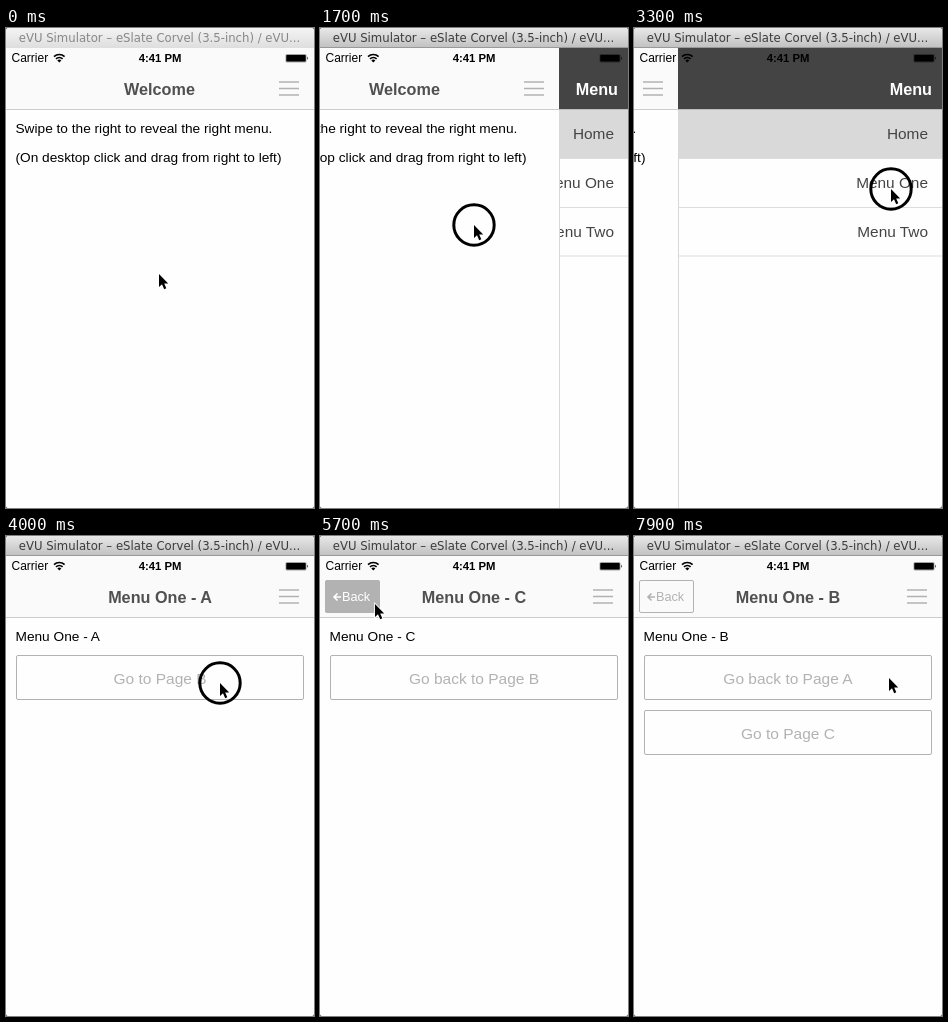
Animation, 308 px wide and 480 px high, one loop 8 s. Source, as an HTML page:

```html
<!DOCTYPE html>
<html lang="en">
<head>
<meta charset="utf-8">
<title>Side menu demo</title>
<style>
html, body { margin: 0; width: 100%; height: 100%; overflow: hidden; background: #666; }
svg { display: block; width: 100vw; height: 100vh; }
text { font-family: "Liberation Sans", Arial, sans-serif; }
.bar { font: 11.7px "DejaVu Sans", "Open Sans", sans-serif; text-anchor: middle; }
.title { font-size: 16.2px; font-weight: 700; fill: #505050; text-anchor: middle; }
.body { font-size: 13.68px; fill: #000; }
.item { font-size: 15.4px; fill: #444; text-anchor: end; }
.btn { font-size: 15.5px; fill: #b2b2b2; text-anchor: middle; }
.line { fill: none; stroke: #b2b2b2; }
.rule { stroke: #ddd; }

/* one loop is 8 s, so 100 ms = 1.25% */
.win, .page, .home, .a, .b, .c, .held, .ring, .cursor { animation: 8s linear infinite; }
.win, .home, .a, .b, .c, .held, .ring { animation-timing-function: step-end; }
.win { animation-name: win; }
.page { animation-name: page; }
.home { animation-name: home; }
.a { animation-name: a; }
.b { animation-name: b; }
.c { animation-name: c; }
.held { animation-name: held; }
.ring { animation-name: ring; }
.cursor { animation-name: cursor; }

.back { --bg: #fafafa; --fg: #b2b2b2; }
.held { --bg: #b2b2b2; --fg: #fff; }

@keyframes win { 0% { opacity: 0 } 16.25%, 100% { opacity: 1 } }
@keyframes home { 0% { opacity: 1 } 43.75%, 100% { opacity: 0 } }
@keyframes a { 0%, 52.5%, 100% { opacity: 0 } 43.75% { opacity: 1 } }
@keyframes b { 0%, 65%, 86.25% { opacity: 0 } 52.5%, 75%, 93.75%, 100% { opacity: 1 } }
@keyframes c { 0%, 75%, 93.75%, 100% { opacity: 0 } 65%, 86.25% { opacity: 1 } }
@keyframes held { 0%, 73.75%, 100% { opacity: 0 } 71.25% { opacity: 1 } }
@keyframes ring {
  0%, 27.5%, 42.5%, 52.5%, 65%, 71.25%, 86.25%, 93.75%, 100% { opacity: 0 }
  12.5%, 40%, 48.75%, 61.25%, 70%, 83.75%, 91.25% { opacity: 1 }
}
@keyframes page {
  0%, 16.25% { transform: translateX(0) }
  21.25% { transform: translateX(-69px) }
  26.25% { transform: translateX(-92px) }
  28.75% { transform: translateX(-148px); animation-timing-function: ease-out }
  33.75%, 43.75% { transform: translateX(-264px); animation-timing-function: ease-out }
  47.5%, 100% { transform: translateX(0) }
}
@keyframes cursor {
  0%, 3.75% { transform: translate(153px, 246px) }
  6.25%, 7.5% { transform: translate(281px, 114px) }
  11.25%, 15% { transform: translate(277px, 190px) }
  21.25% { transform: translate(154px, 197px) }
  25%, 32.5% { transform: translate(136px, 190px) }
  38.75%, 43.75% { transform: translate(257px, 161px) }
  48.75%, 53.75% { transform: translate(214px, 147px) }
  60%, 66.25% { transform: translate(175px, 197px) }
  70%, 77.5% { transform: translate(55px, 68px) }
  82.5%, 87.5% { transform: translate(165px, 197px) }
  91.25%, 95% { transform: translate(117px, 147px) }
  98.75%, 100% { transform: translate(255px, 142px) }
}
</style>
</head>
<body>
<svg viewBox="0 0 308 480">
  <defs>
    <linearGradient id="idle" x2="0" y2="1"><stop stop-color="#f4f4f4"/><stop offset="1" stop-color="#dedede"/></linearGradient>
    <linearGradient id="live" x2="0" y2="1"><stop stop-color="#e8e8e8"/><stop offset="1" stop-color="#c0c0c0"/></linearGradient>
    <clipPath id="frame"><rect width="308" height="480" rx="3"/></clipPath>
    <rect id="box" x="10.5" y="119.5" width="287" height="44" rx="1.5" class="line"/>
    <text id="name" x="153.5" y="14" class="bar">eVU Simulator – eSlate Corvel (3.5-inch) / eVU...</text>
    <g id="back">
      <rect x="5.5" y="44.5" width="54" height="32" rx="1.5" stroke="#b2b2b2" style="fill:var(--bg)"/>
      <path d="M21 61H14.5M17.5 57.5L14 61L17.5 64.5" fill="none" stroke-width="1.6" style="stroke:var(--fg)"/>
      <text x="22" y="65.3" font-size="12.7" style="fill:var(--fg)">Back</text>
    </g>
  </defs>

  <g clip-path="url(#frame)">
    <rect width="308" height="480" fill="#fefefe"/>

    <g class="menu">
      <rect x="40" y="20" width="268" height="61.5" fill="#444"/>
      <text x="298" y="66.5" class="title" style="fill:#fff;text-anchor:end">Menu</text>
      <rect x="40" y="81.5" width="268" height="49" fill="#d9d9d9"/>
      <path d="M40 130.5H308M40 179.5H308M40 228H308" class="rule"/>
      <text x="294" y="111" class="item">Home</text>
      <text x="294" y="160" class="item">Menu One</text>
      <text x="294" y="209" class="item">Menu Two</text>
    </g>

    <g class="page">
      <path d="M308.5 82V480" stroke="#d8d8d8"/>
      <rect y="20" width="308" height="460" fill="#fefefe"/>
      <rect y="20" width="308" height="61" fill="#fafafa"/>
      <path d="M0 81.5H308" stroke="#ccc"/>
      <path d="M273 54H293M273 60.5H293M273 67H293" class="line" stroke-width="1.5"/>

      <g class="home">
        <text x="153.5" y="66.5" class="title">Welcome</text>
        <text x="9.5" y="105" class="body">Swipe to the right to reveal the right menu.</text>
        <text x="9.5" y="134" class="body">(On desktop click and drag from right to left)</text>
      </g>
      <g class="a">
        <text x="154" y="66.5" class="title">Menu One - A</text>
        <text x="9.5" y="105" class="body">Menu One - A</text>
        <use href="#box"/>
        <text x="154" y="148" class="btn">Go to Page B</text>
      </g>
      <g class="b">
        <use href="#back" class="back"/>
        <text x="154" y="66.5" class="title">Menu One - B</text>
        <text x="9.5" y="105" class="body">Menu One - B</text>
        <use href="#box"/>
        <text x="154" y="148" class="btn">Go back to Page A</text>
        <use href="#box" y="55"/>
        <text x="154" y="203" class="btn">Go to Page C</text>
      </g>
      <g class="c">
        <use href="#back" class="back"/>
        <use href="#back" class="held"/>
        <text x="154" y="66.5" class="title">Menu One - C</text>
        <text x="9.5" y="105" class="body">Menu One - C</text>
        <use href="#box"/>
        <text x="154" y="148" class="btn">Go back to Page B</text>
      </g>
    </g>

    <g class="status">
      <text x="5.5" y="34.3" font-size="12">Carrier</text>
      <path d="M48 28.6A7.6 7.6 0 0 1 58.6 28.6M50 30.9A4.8 4.8 0 0 1 56.6 30.9" fill="none" stroke="#000" stroke-width="1.6"/>
      <path d="M51.3 32.4A2.8 2.8 0 0 1 55.3 32.4L53.3 34.6Z"/>
      <text x="154" y="34.3" font-size="11.3" font-weight="700" text-anchor="middle">4:41 PM</text>
      <rect x="279.5" y="26" width="21" height="8.5" rx="1.5" fill-opacity=".35"/>
      <rect x="280.3" y="27" width="19.4" height="6.5" rx=".8"/>
      <path d="M301.3 28.5Q303 30.2 301.3 32Z"/>
    </g>

    <rect width="308" height="20" fill="url(#idle)"/>
    <use href="#name" fill="#888"/>
    <g class="win">
      <rect width="308" height="20" fill="url(#live)"/>
      <path d="M0 19.5H308" stroke="#999"/>
      <use href="#name" fill="#3c3c3c"/>
    </g>

    <g class="cursor">
      <circle class="ring" r="20.2" fill="none" stroke="#000" stroke-width="3"/>
      <path d="M0 0V13L3 10.2L5.2 15.2L7.3 14.3L5.2 9.4H9.2Z" stroke="#fff" stroke-width="1.6" paint-order="stroke"/>
    </g>
  </g>
</svg>
</body>
</html>
```
